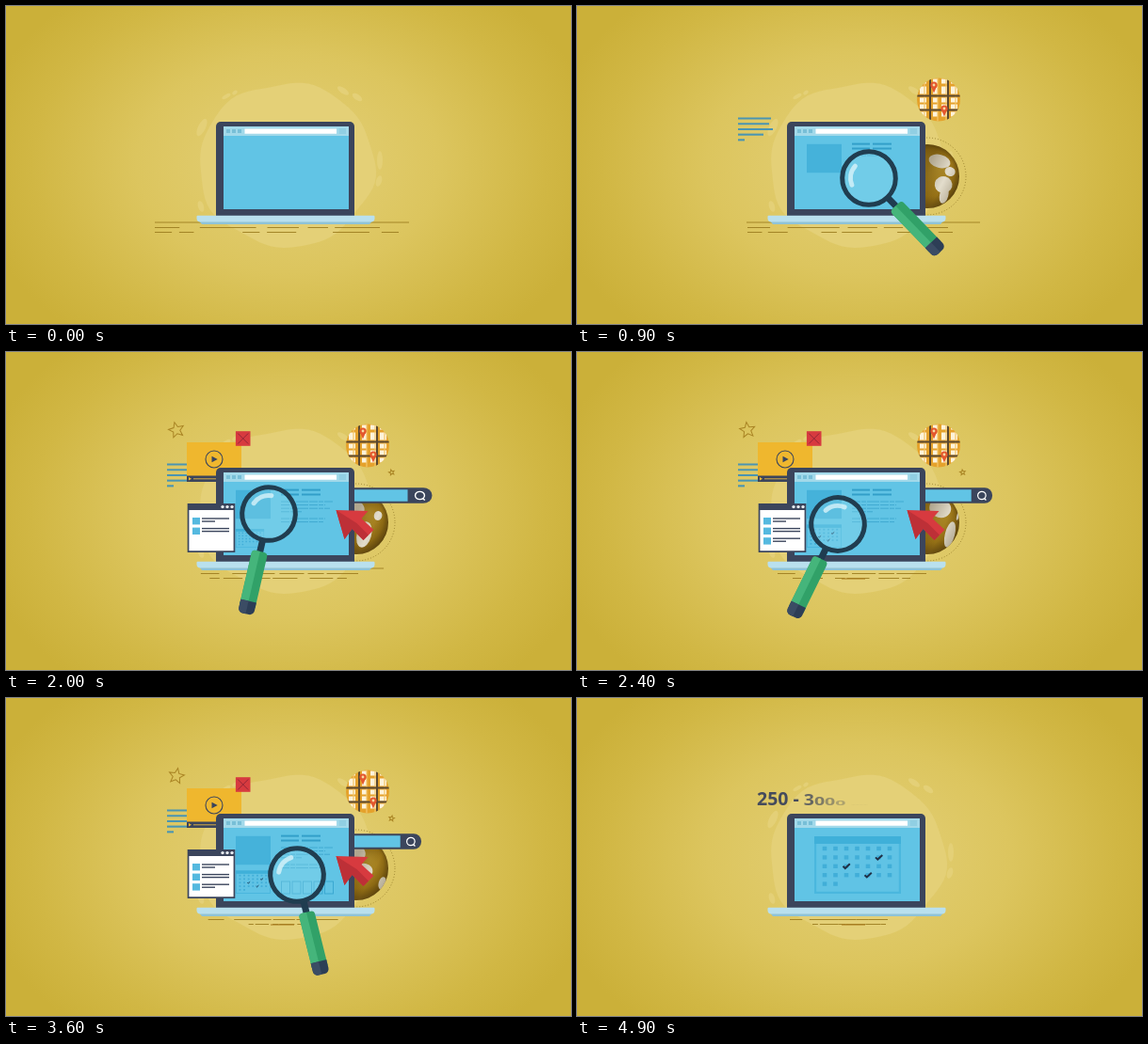
Write an HTML page with a canvas that moves like this. It is 600 px wide and 338 px high and loops after 5000 ms.

```html
<!DOCTYPE html>
<html lang="en">
<head>
<meta charset="utf-8">
<title>Laptop research</title>
<style>
html, body { margin: 0; width: 100%; height: 100%; overflow: hidden; background: #d0b440; }
canvas { display: block; width: 100vw; height: 100vh; }
</style>
</head>
<body>
<canvas id="stage" width="600" height="338"></canvas>
<script>
const c = document.getElementById('stage').getContext('2d');
const LOOP = 5000, STEP = 100;
const NAVY = '#3b455c', SKY = '#61c4e5', SHADE = '#45b2da', RED = '#d73a3f', GOLD = '#efb72e';

const clamp = v => Math.max(0, Math.min(1, v));
const lerp = (a, b, u) => a + (b - a) * u;
const part = (t, start, dur) => clamp((t - start) / dur);
const smooth = u => u * u * (3 - 2 * u);
const out = u => 1 - (1 - u) ** 3;
const back = (u, s = 1.9) => u <= 0 ? 0 : 1 + (s + 1) * (u - 1) ** 3 + s * (u - 1) ** 2;
const leave = t => 1 - part(t, 3600, 250) ** 2;
const pop = (t, start, dur = 450, s) => back(part(t, start, dur), s) * leave(t);

function box(x, y, w, h, fill, r = 0) {
  c.fillStyle = fill;
  c.beginPath();
  c.roundRect(x, y, w, h, r);
  c.fill();
}
function disc(x, y, rx, ry, fill, rot = 0) {
  c.fillStyle = fill;
  c.beginPath();
  c.ellipse(x, y, rx, ry, rot, 0, Math.PI * 2);
  c.fill();
}
function trace(points, close) {
  c.beginPath();
  points.forEach(([x, y]) => c.lineTo(x, y));
  if (close) c.closePath();
}
function stroke(color, width) {
  c.strokeStyle = color;
  c.lineWidth = width;
  c.stroke();
}
function poly(points, fill) {
  trace(points, true);
  c.fillStyle = fill;
  c.fill();
}
function line(x0, y0, x1, y1, color, width) {
  trace([[x0, y0], [x1, y1]]);
  stroke(color, width);
}
// Draw with the origin at (x, y); skipped while the part is invisible
function at(x, y, sx, sy, rot, draw) {
  if (sx <= 0.001 || sy <= 0.001) return;
  c.save();
  c.translate(x, y);
  c.rotate(rot);
  c.scale(sx, sy);
  draw();
  c.restore();
}

// Smooth curve through rows of [time, ...values]
function follow(keys, t) {
  let i = 0;
  while (i < keys.length - 2 && t > keys[i + 1][0]) i++;
  const a = keys[i], b = keys[i + 1], p = keys[i - 1] || a, n = keys[i + 2] || b;
  const span = b[0] - a[0], u = clamp((t - a[0]) / span);
  return a.slice(1).map((v, k) => {
    k++;
    const m0 = (b[k] - p[k]) / (b[0] - p[0]) * span;
    const m1 = (n[k] - a[k]) / (n[0] - a[0]) * span;
    return v + u * m0 + u * u * (3 * (b[k] - v) - 2 * m0 - m1) + u ** 3 * (2 * (v - b[k]) + m0 + m1);
  });
}

function backdrop() {
  at(300, 169, 1, 0.72, 0, () => {
    const g = c.createRadialGradient(0, -5, 20, 0, 0, 335);
    g.addColorStop(0, '#e3cf75');
    g.addColorStop(0.45, '#dcc55e');
    g.addColorStop(0.8, '#d1b744');
    g.addColorStop(1, '#cbb039');
    c.fillStyle = g;
    c.fillRect(-300, -240, 600, 480);
  });
  const tint = '#e4d077', blob = [];
  for (let i = 0; i < 90; i++) {
    const a = i / 90 * Math.PI * 2;
    const r = 1 + 0.018 * Math.sin(5 * a + 1) + 0.014 * Math.sin(8 * a);
    blob.push([298 + 93 * r * Math.cos(a), 169 + 87 * r * Math.sin(a)]);
  }
  poly(blob, tint);
  disc(234, 96, 5, 2, tint, -0.5);
  disc(243, 92, 3, 2, tint, -0.7);
  disc(358, 90, 7, 3, tint, 0.6);
  disc(373, 97, 6, 3, tint, 0.6);
  disc(208, 129, 4, 10, tint, 0.45);
  disc(397, 164, 3, 10, tint);
  disc(396, 186, 3, 6, tint, 0.3);
  disc(207, 213, 3, 6, tint, -0.3);
}

function ground(t) {
  const ink = '#9c7d20', u = t / LOOP;
  const [l1, r1, l2, r2, l3, r3] = follow([
    [0, 158, 428, 158, 397, 158, 417],
    [900, 180, 428, 181, 394, 181, 399],
    [1600, 198, 417, 198, 379, 203, 372],
    [2400, 215, 385, 213, 371, 229, 354],
    [3200, 225, 370, 211, 370, 250, 342],
    [3900, 230, 360, 218, 340, 260, 321],
    [4900, 235, 350, 226, 330, 250, 328]], t);
  line(l1, 230, r1, 230, ink, 0.9);
  const dashes = (l, r, y, gaps) => {
    line(l, y, r, y, ink, 0.9);
    return gaps;
  };
  const row = (l, r, y, ends) => {
    for (let i = 0; i < ends.length; i += 2) {
      const gap = i + 2 < ends.length ? (ends[i + 2] - ends[i + 1]) * u * (i ? 1 : 0.2) : 0;
      line(lerp(l, r, ends[i]), y, lerp(l, r, ends[i + 1] + gap), y, ink, 0.9);
    }
  };
  row(l2, r2, 235.5, [0, 0.11, 0.2, 0.45, 0.5, 0.64, 0.68, 0.77, 0.8, 1]);
  row(l3, r3, 240.5, [0, 0.07, 0.1, 0.16, 0.36, 0.43, 0.46, 0.58, 0.73, 0.88, 0.93, 1]);
  if (t > 2300) line(281, 241, 306, 241, '#a8791a', 1);
}

function globe(t) {
  at(372, 181, pop(t, 350), pop(t, 350), 0, () => {
    c.save();
    c.setLineDash([1, 2]);
    c.beginPath();
    c.arc(0, 0, 41, 0, 7);
    stroke('#8c7424', 0.8);
    c.restore();
    c.save();
    c.beginPath();
    c.arc(0, 0, 34, 0, 7);
    c.clip();
    const g = c.createRadialGradient(12, -10, 3, 0, 0, 36);
    g.addColorStop(0, '#ba952d');
    g.addColorStop(0.65, '#9b7518');
    g.addColorStop(1, '#604711');
    c.fillStyle = g;
    c.fillRect(-35, -35, 70, 70);
    // Longitude, height, half width, half height of each land mass
    const land = [[0.45, -16, 13, 7], [0.8, -5, 8, 5], [0.55, 9, 11, 9], [0.7, 20, 6, 9],
      [2.1, -17, 14, 10], [2.5, 2, 9, 7], [3.4, 16, 10, 7], [4.5, -15, 13, 10], [4.9, 13, 8, 14], [5.4, -7, 6, 5]];
    for (const [lon, y, w, h] of land) {
      const a = lon + (t - 900) / 1000 * 1.5, k = Math.cos(a);
      if (k > 0) disc(Math.sin(a) * Math.sqrt(34 * 34 - y * y), y, w * k, h, '#eee9dc', 0.25);
    }
    for (let y = -34; y < 35; y += 2) line(-34, y, 34, y, 'rgba(91,64,8,.22)', 0.7);
    const s = c.createLinearGradient(-5, 0, 34, 20);
    s.addColorStop(0, 'rgba(60,40,0,.3)');
    s.addColorStop(0.5, 'rgba(60,40,0,0)');
    s.addColorStop(1, 'rgba(50,35,0,.35)');
    c.fillStyle = s;
    c.fillRect(-35, -35, 70, 70);
    c.restore();
  });
}

function pin(x, y) {
  poly([[x - 3.4, y], [x + 3.4, y], [x, y + 8]], '#e4572e');
  disc(x, y - 0.5, 3.6, 3.6, '#e4572e');
  disc(x, y - 0.5, 1.4, 1.4, '#f6d9a0');
}

function map(t) {
  const s = pop(t, 250);
  at(384, 99.5, s, s, 0, () => {
    c.save();
    c.beginPath();
    c.arc(0, 0, 23, 0, 7);
    c.clip();
    c.fillStyle = '#e5a22c';
    c.fillRect(-24, -24, 48, 48);
    for (const x of [-20, -6, 3, 13])
      for (const y of [-22, -14, -2, 5, 13]) box(x, y, x === -6 ? 5 : 7, y === -14 ? 8 : 5, '#fdf3da');
    for (const x of [-15, -1, 8, 18]) line(x, -24, x, 24, '#f3c76c', 1.2);
    for (const x of [-9, 10]) line(x, -24, x, 24, '#5a4930', 2);
    for (const y of [-4, 11]) line(-24, y, 24, y, '#5a4930', 2);
    c.restore();
    pin(-5, -15);
    pin(6, 10);
  });
}

function notes(t) {
  [35, 33, 37, 27, 7].forEach((w, i) => {
    const u = out(part(t, 450 + i * 50, 250)) * leave(t);
    if (u > 0) box(171, 118.5 + i * 5.7, w * u, 2.1, '#4a95b2');
  });
}

function video(t) {
  const s = pop(t, 1250);
  at(221, 117, s, s, 0, () => {
    box(-29, -21, 58, 42, GOLD);
    box(-29, 14.5, 58, 6.5, NAVY);
    poly([[-27, 16], [-27, 19.5], [-24, 17.8]], GOLD);
    line(-22, 17.8, 20, 17.8, '#d4ac45', 1);
    c.beginPath();
    c.arc(0, -3, 9, 0, 7);
    stroke(NAVY, 1.1);
    poly([[-2.5, -6.3], [-2.5, 0.3], [3.7, -3]], NAVY);
  });
  const r = pop(t, 1300, 450, 2.6);
  at(251.7, 92, r, r, 0, () => {
    box(-7.8, -7.8, 15.6, 15.6, RED);
    line(-5.5, -5.5, 5.5, 5.5, '#8b2435', 0.9);
    line(5.5, -5.5, -5.5, 5.5, '#8b2435', 0.9);
  });
}

function star(t, x, y, r, start) {
  const s = pop(t, start);
  at(x, y, s, s, 0.25 * Math.sin(t / 420), () => {
    const pts = [];
    for (let i = 0; i < 10; i++) {
      const a = i * Math.PI / 5 - Math.PI / 2, q = i % 2 ? r * 0.45 : r;
      pts.push([Math.cos(a) * q, Math.sin(a) * q]);
    }
    trace(pts, true);
    stroke('#a98424', 1);
  });
}

function search(t) {
  at(370, 152.5, pop(t, 1540, 700, 2.6) * 1.015, leave(t), 0, () => {
    box(-12, -8.3, 82, 16.6, NAVY, [0, 8, 8, 0]);
    box(-12, -6.2, 60, 12.4, SKY);
    c.beginPath();
    c.arc(59, 0, 4.2, 0, 7);
    stroke('#fff', 1.2);
    line(61.5, 3, 63.5, 5, '#fff', 1.2);
  });
}

function laptop() {
  box(223, 123, 147, 101, NAVY, [5, 5, 0, 0]);
  box(231, 128, 133, 88, SKY);
  box(231, 128, 133, 10, '#a2d9ea');
  box(253.5, 130.4, 97.5, 5.4, '#fff');
  for (const x of [234, 240, 246]) box(x, 131, 4, 4, '#78bfd7');
  for (const y of [131, 133, 135]) line(353.5, y, 361, y, '#78bfd7', 0.8);
  poly([[203, 226], [391, 226], [386, 232], [208, 232]], '#8fc3d7');
  box(202.5, 222.7, 189, 6.8, '#b9e0ee', [1, 1, 4, 4]);
}

function page(t) {
  const gone = leave(t);
  if (gone <= 0) return;
  c.save();
  c.globalAlpha = gone;
  const s = out(part(t, 400, 350));
  at(262.5, 162, s, s, 0, () => box(-18.5, -15.3, 37, 30.6, SHADE));
  [146.6, 151.5].forEach((y, i) => {
    const u = out(part(t, 600 + i * 80, 250));
    box(292, y - 1, 19 * u, 2, '#329fc9');
    box(314, y - 1, 20 * u, 2, '#329fc9');
  });
  [159, 162.6, 166.2, 169.8, 177, 180.6].forEach((y, i) => {
    const u = out(part(t, 800 + i * 180, 320)), w = [55, 47, 52, 22, 47, 45][i];
    if (u <= 0) return;
    c.setLineDash([9, 1, 5, 1, 13, 1]);
    line(292, y, 292 + w * u, y, '#3da8d0', 0.9);
  });
  c.setLineDash([]);
  for (let i = 0; i < 5; i++) {
    const u = back(part(t, 2550 + i * 70, 300));
    at(297 + i * 11.5, 201.5, u, u, 0, () => {
      c.strokeStyle = '#37a5cf';
      c.lineWidth = 0.9;
      c.strokeRect(-4.5, -6.5, 9, 13);
    });
  }
  c.restore();
}

function calendar(t) {
  const grow = smooth(part(t, 3600, 700));
  const s = lerp(37, 92, grow) / 92 * out(part(t, 1850, 350));
  at(lerp(244, 252, grow), 208, s, s, 0, () => {
    box(0, -61, 92, 61, '#4ab7de');
    box(2.2, -53, 87.6, 50.8, '#60c3e5');
    box(0, -61, 92, 8, '#3fb0d9');
    const cell = (col, row) => [11 + 11.5 * col, -48 + 9.4 * row];
    for (let i = 0; i < 30; i++) {
      const [x, y] = cell(i % 7, Math.floor(i / 7));
      box(x - 2.3, y - 2.2, 4.6, 4.4, '#41aed8');
    }
    [[2, 2], [5, 1], [4, 3]].forEach(([col, row], i) => {
      const u = back(part(t, 2150 + i * 80, 250)), [x, y] = cell(col, row);
      at(x, y, u, u, 0, () => {
        trace([[-3.5, 0], [-1.2, 2.2], [3.8, -2.5]]);
        stroke('#203047', 2);
      });
    });
  });
}

function list(t) {
  const s = pop(t, 1150), h = lerp(43, 52, smooth(part(t, 1600, 350)));
  at(218, 182, s, s, 0, () => {
    box(-25.3, -21, 50.6, h, NAVY);
    box(-23.6, -14, 47.2, h - 8.7, '#fff');
    for (const x of [12, 17, 22]) disc(x, -17.4, 1.7, 1.7, '#e8edf2');
    for (let i = 0; i < 3; i++) {
      const u = out(part(t, 1450 + i * 300, 250)), y = lerp(-9, -6, part(t, 1600, 350)) + i * 10.6;
      if (u <= 0) continue;
      box(-20, y, 8 * u, 7.4, '#55b9df');
      box(-10, y + 0.3, 29 * u, 1.4, NAVY);
      box(-10, y + 3.3, (i === 1 ? 29 : 14) * u, 1.4, NAVY);
    }
  });
}

function pointer(t) {
  const s = pop(t, 1300);
  at(350.5, 168, s, s, 0, () => {
    poly([[0, 0], [34, 1], [27, 9], [40, 21], [29, 32], [17, 20], [9, 31]], RED);
    poly([[0, 0], [22, 14], [34.5, 26.5], [29, 32], [17, 20], [9, 31]], '#bd3037');
  });
}

function lens(t) {
  if (t < 100 || t > 4000) return;
  const [x, y, deg] = follow([
    [0, 322, 430, 30], [200, 336, 322, 40], [400, 336, 232, 47], [600, 327, 200, 48],
    [900, 310, 183, 44], [1250, 297, 168, 28], [1600, 290, 163, 8], [2000, 279, 172, -13],
    [2400, 277, 183, -26], [2800, 300, 178, -10], [3200, 321, 164, 12], [3450, 321, 166, 15],
    [3600, 309, 188, 14], [3750, 276, 262, 8], [3900, 237, 365, 0], [4050, 200, 470, -5]], t);
  at(x, y, 1, 1, -deg * Math.PI / 180, () => {
    box(-3.5, 29, 7, 15, '#1f3c50');
    box(-8.5, 41, 17, 60, '#31a168', [4, 4, 0, 0]);
    box(-8.5, 41, 8.5, 60, '#45b57b', [4, 0, 0, 0]);
    box(-8.5, 95, 17, 14, '#2d3e56', [0, 0, 5, 5]);
    box(-8.5, 95, 8.5, 14, '#3b4c64', [0, 0, 0, 5]);
    disc(0, 0, 28, 28, 'rgba(150,221,239,.3)');
    c.beginPath();
    c.arc(0, 0, 28.3, 0, 7);
    stroke('#203d50', 5);
    c.lineCap = 'round';
    c.beginPath();
    c.arc(0, 0, 19.5, -2.75, -1.65);
    stroke('rgba(216,242,249,.8)', 5);
    c.lineCap = 'butt';
  });
}

function caption(t) {
  c.font = '700 19.5px "Open Sans", "Noto Sans", sans-serif';
  const text = '250 - 3000 Words';
  for (let i = 0; i < text.length; i++) {
    const u = part(t, 4390 + i * 45, 300);
    if (u <= 0) continue;
    c.globalAlpha = u;
    at(191 + c.measureText(text.slice(0, i)).width, 113.5, 1, u, 0, () => {
      c.fillStyle = '#454b5c';
      c.fillText(text[i], 0, 0);
    });
  }
  c.globalAlpha = 1;
}

function draw(t) {
  backdrop();
  ground(t);
  globe(t);
  map(t);
  notes(t);
  video(t);
  star(t, 181, 83, 8.5, 1150);
  star(t, 409.5, 128, 3, 1250);
  search(t);
  laptop();
  page(t);
  calendar(t);
  list(t);
  lens(t);
  pointer(t);
  caption(t);
}

const start = performance.now();
function tick() {
  const t = (performance.now() - start) % LOOP;
  draw(Math.floor(t / STEP) * STEP);
  requestAnimationFrame(tick);
}
tick();
</script>
</body>
</html>
```
